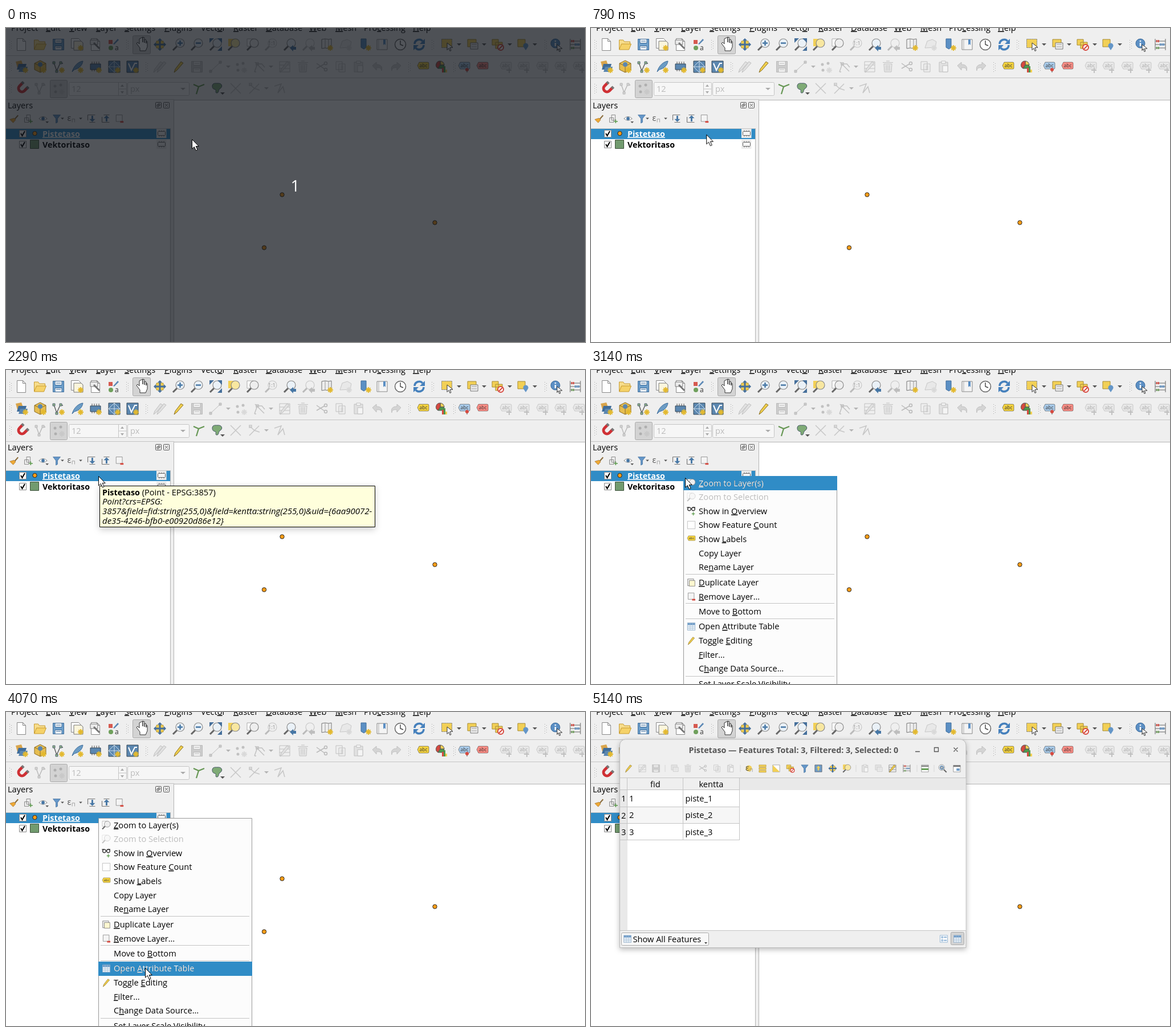
An HTML page for the animation above (8000 ms loop, 1016 px wide and 551 px high).

```html
<!DOCTYPE html>
<html lang="en">
<head>
<meta charset="utf-8">
<title>Opening an attribute table</title>
<style>
html, body { margin: 0; width: 100%; height: 100%; overflow: hidden; background: #fff; }
svg { display: block; }
text { font: 14.6px "Open Sans", "Noto Sans", sans-serif; white-space: pre; }
.b { font-weight: 700; font-size: 14.3px; }
.i { font-style: italic; font-size: 15px; }
.u { text-decoration: underline; }
.off { filter: grayscale(1); opacity: .38; }
.line { fill: none; stroke: #c4c4c4; }

#dim, #tip, #menu, #win, #hand, #arrow, #cursor, .hl { animation: 8s step-end infinite; }
#dim { animation-name: dim; }
#tip { animation-name: tip; filter: drop-shadow(0 4px 6px #0003); }
#menu { animation-name: menu; }
#win { animation-name: win; transform-origin: 354px 230px; }
#frame { filter: drop-shadow(0 3px 5px #0004); }
#hand { animation-name: hand; }
#arrow { animation-name: arrow; }
#cursor { animation-name: move; }
.hl { animation-name: hl; }

@keyframes dim { 0% { opacity: 1 } .87%, to { opacity: 0 } }
@keyframes tip { 0% { opacity: 0 } 28.62% { opacity: 1 } 32.12%, to { opacity: 0 } }
@keyframes menu { 0% { opacity: 0 } 32.12% { opacity: 1 } 55.37%, to { opacity: 0 } }
@keyframes hand { 0% { opacity: 0 } .87% { opacity: 1 } 4.4%, to { opacity: 0 } }
@keyframes arrow { 0% { opacity: 1 } .87% { opacity: 0 } 4.4%, to { opacity: 1 } }
@keyframes win {
  0% { opacity: 0; transform: scale(.8) }
  57.1% { opacity: 0; transform: scale(.8); animation-timing-function: steps(4, start) }
  60.7%, to { opacity: 1; transform: none }
}
@keyframes move {
  0% { transform: translate(326px, 195px) }
  2.62% { transform: translate(326px, 195px); animation-timing-function: steps(12, start) }
  13.38% { transform: translate(161px, 184px) }
  15.12% { transform: translate(161px, 184px); animation-timing-function: steps(3, start) }
  17.8% { transform: translate(160px, 185px) }
  19.62% { transform: translate(162px, 186px) }
  39.24% { transform: translate(165px, 189px) }
  40.12% { transform: translate(165px, 189px); animation-timing-function: steps(5, start) }
  44.6% { transform: translate(248px, 471px) }
  45.5% { transform: translate(248px, 471px); animation-timing-function: steps(7, start) }
  51.7% { transform: translate(244px, 449px) }
  58% { transform: translate(244px, 449px); animation-timing-function: steps(7, start) }
  64.2%, to { transform: translate(244px, 560px) }
}
@keyframes hl {
  0% { transform: translateY(-60px) }
  39.24% { transform: translateY(186px) }
  40.12% { transform: translateY(235px) }
  41% { transform: translateY(284.5px) }
  41.9% { transform: translateY(360.5px) }
  42.8% { transform: translateY(411.5px) }
  43.7% { transform: translateY(463px) }
  47.25%, to { transform: translateY(438px) }
}
</style>
</head>
<body>
<svg width="1016" height="551" viewBox="0 0 1016 551">
<defs>
  <path id="star" d="M6 1v10M1 6h10M2.5 2.5l7 7M9.5 2.5l-7 7" stroke="#e3b92f" stroke-width="2" fill="none"/>
  <path id="grip" d="M-1.5-8v17M1.5-6v15" stroke="#aaa" stroke-dasharray="1 3"/>
  <path id="drop" d="M-4-2h8l-4 4z" fill="#555"/>
  <path id="sep" d="M0-9v18" stroke="#ccc"/>
  <path id="page" d="M-7.5-10.5h10l5 5v16h-15zM2.5-10.5v5h5" fill="#fff" stroke="#888"/>
  <g id="folder" stroke="#c79a2f" stroke-linejoin="round"><path d="M-10.5 9V-8h7l2 3h10v4" fill="#f7dd8c"/><path d="M-10.5 9l4-10h17l-4 10z" fill="#f5d269"/></g>
  <g id="save" stroke="#3f6d9b"><path d="M-9.5-9.5h19v19h-19z" fill="#6d9fcb"/><path d="M-6-9.5h12v7h-12zM-6 2.5h12v7h-12z" fill="#f2f5f8"/><path d="M-4-6h8M-4 5h8"/></g>
  <g id="layout"><path d="M-10.5-10.5h13l3 3v14h-16z" fill="#fff" stroke="#888"/><path d="M-6-6h13l3 3v13h-16z" fill="#faf5dd" stroke="#777"/><use href="#star"/></g>
  <g id="manager"><use href="#page"/><path d="M-9-8h13v8h-13z" fill="#ececec" stroke="#777"/><path d="M-3-3l10 10" stroke="#777" stroke-width="3"/></g>
  <g id="style"><path d="M-9-8h7v7h-7z" fill="#d65a50"/><path d="M-1-1l8-9 2 2-8 8z" fill="#5a87b5"/><circle cx="-5" cy="6" r="4" fill="#6fa05c"/><text x="2" y="10" style="font-size:12px" fill="#333">a</text></g>
  <g id="pan"><path d="M-5-10v9l-3-3-2 2 6 8v5h10l3-7v-9l-2-1v4-6l-3-1v6-9l-3-1v9-9z" transform="translate(1)" fill="#fff" stroke="#333" stroke-linejoin="round"/></g>
  <g id="arrows"><path d="M-6-6h12v12h-12z" fill="#f2d056" stroke="#b89525"/><path d="M0-11l4 4H1.5v5.5H7V-4l4 4-4 4V1.5H1.5V7H4l-4 4-4-4h2.5V1.5H-7V4l-4-4 4-4v2.5h5.5V-7H-4z" fill="#456f9b"/></g>
  <g id="lens"><path d="M-10 10l7-7" stroke="#666" stroke-width="3"/><circle cx="2.5" cy="-2.5" r="7.5" stroke="#8a8a8a" stroke-width="1.2"/></g>
  <g id="zin"><use href="#lens" fill="#eaf1f7"/><path d="M-2-2.5h9M2.5-7v9" stroke="#4777a5" stroke-width="2.5"/></g>
  <g id="zout"><use href="#lens" fill="#eaf1f7"/><path d="M-2-2.5h9" stroke="#4777a5" stroke-width="2.5"/></g>
  <g id="zfull"><use href="#lens" fill="#eaf1f7"/><path d="M-11-11h8l-8 8zM11-11v8l-8-8zM11 11h-8l8-8z" fill="#456f9b"/></g>
  <g id="zsel"><path d="M-10-10h11v13h-11z" fill="#f2d056"/><use href="#lens" fill="#f8e7a0"/></g>
  <g id="zlay"><path d="M-10-10h11v13h-11z" fill="#fff" stroke="#aaa"/><use href="#lens" fill="#eee"/></g>
  <g id="zone"><use href="#lens" fill="#eee"/><text x="-5" y="1" style="font-size:9px">1:1</text></g>
  <g id="zlast"><use href="#lens" fill="#eaf1f7"/><path d="M0 6l6-5v3h5v5H6v3z" fill="#4777a5"/></g>
  <g id="map"><path d="M-9-9l6-1 6 1 5-1v16l-5 1-6-1-6 1z" fill="#eee" stroke="#777"/><path d="M-3-10V6M3-9V7" stroke="#999"/><use href="#star"/></g>
  <g id="cube"><path d="M-10 6l4-12 9-3 7 4-2 10z" fill="#ddd" stroke="#888"/><use href="#star"/></g>
  <g id="mark"><path d="M-7-10h9v15l-4 3-5-3z" fill="#5b8fc4" stroke="#3f6d9b"/><use href="#star"/></g>
  <g id="book"><path d="M-9-9h18v18h-18z" fill="#f4f4f4" stroke="#888"/><path d="M-6-9V9" stroke="#aaa"/><path d="M2-9h4v10l-2-2-2 2z" fill="#5b8fc4"/></g>
  <g id="clock"><circle r="9.5" fill="#fff" stroke="#666" stroke-width="1.5"/><path d="M0-7v7l5 2" fill="none" stroke="#444" stroke-width="1.4"/></g>
  <g id="reload"><path d="M-8-1a8 8 0 0 1 14-5M8 1a8 8 0 0 1-14 5" fill="none" stroke="#4580bc" stroke-width="3.5"/><path d="M10-10v9H1zM-10 10V1h9z" fill="#4580bc"/></g>
  <g id="select"><path d="M-9.5-9.5h18v15h-18z" fill="#f2d056" stroke="#777" stroke-dasharray="2 1"/><path d="M0-3l10 8-5 .5 2 5-2 1-2-5-3 3z" fill="#fff" stroke="#333"/></g>
  <g id="form"><path d="M-9-9h15v13h-15z" fill="#f2d056" stroke="#a58a35"/><path d="M-4-3h13v11h-13z" fill="#eee" stroke="#777"/><path d="M-2 0h9M-2 4h9" stroke="#999"/></g>
  <g id="fields" fill="#c5dbee" stroke="#6f9cc8"><path d="M-9.5-9h19V9h-19z" fill="#fff"/><path d="M-6-6h4v4h-4zM-6 2h4v4h-4zM1-5h6v2H1zM1 3h6v2H1z"/></g>
  <g id="unsel"><path d="M-10-9H1V1h-11zM-4-4h12V7H-4z" fill="#f2d056" stroke="#a58a35"/><circle cx="5" cy="5" r="5" fill="#fff" stroke="#d6493f" stroke-width="2"/><path d="M2 8l6-6" stroke="#d6493f" stroke-width="2"/></g>
  <g id="place"><path d="M-9-9H4V4H-9z" fill="#f2d056" stroke="#a58a35"/><path d="M5 10L1 4a4.5 4.5 0 1 1 8 0z" fill="#6496c8"/></g>
  <g id="info"><circle cx="-2" cy="-2" r="8" fill="#5b8fc4" stroke="#3f6d9b"/><path d="M-2-7v2M-2-3v6" stroke="#fff" stroke-width="2.5"/><path d="M1 0l9 7-5 .5 2 4-2 1-2-5-2 3z" fill="#fff" stroke="#333"/></g>
  <g id="abacus"><path d="M-9-10V10M9-10V10M-9-6H9M-9 0H9M-9 6H9" stroke="#666"/><g stroke-width="4" stroke-dasharray="2 1"><path d="M-7-6h6" stroke="#d6493f"/><path d="M-1 0h8" stroke="#5b8fc4"/><path d="M-7 6h6" stroke="#6fa05c"/></g></g>
  <g id="stack"><path d="M-11-9l10-2 4 11-10 5z" fill="#d9a54c"/><path d="M-6-5h14L5 5H-9z" fill="#3f6d9b"/><path d="M-3 0h13L7 9H-6z" fill="#5b87b0"/><use href="#star"/></g>
  <g id="pack"><path d="M0-11L10-6V5L0 10-10 5V-6z" fill="#e6bd50" stroke="#8a6b22"/><path d="M-10-6L0-1l10-5M0-1v11" fill="none" stroke="#8a6b22"/><circle cy="-4" r="4" fill="#5b87b0"/><use href="#star"/></g>
  <g id="vec"><path d="M-8-7l5 14 6-13 5 0" fill="none" stroke="#555" stroke-width="1.3"/><path d="M-10-9h4v4h-4zM-5 6h4v4h-4zM2-9h4v4H2z" fill="#8fb383" stroke="#567"/></g>
  <g id="vstar"><use href="#vec"/><use href="#star"/></g>
  <g id="quill"><path d="M-9 9C-6-2 2-9 10-10 9-3 4 3-5 5z" fill="#6b9cc5" stroke="#3f6d9b"/><use href="#star"/></g>
  <g id="chip"><path d="M-6-9V8M-2-9V8M2-9V8M6-9V8" stroke="#555"/><path d="M-9-5H9V5H-9z" fill="#5b87b0" stroke="#345"/><use href="#star"/></g>
  <g id="mesh"><path d="M-10-10h20v20h-20z" fill="#5b87b0" stroke="#345"/><path d="M-10 0h20M0-10v20M-10 0L0-10 10 0 0 10z" fill="none" stroke="#cfe0ee"/><use href="#star"/></g>
  <g id="virt"><path d="M-10-10h20v20h-20z" fill="#5b87b0" stroke="#345"/><path d="M-7-6L-2 6 4-6h4" fill="none" stroke="#fff" stroke-width="2"/><use href="#star"/></g>
  <path id="pencil" d="M-8 10l2-6L4-9l4 2.5L-3 6z" fill="#f0cf4d" stroke="#8a6f22"/>
  <g id="pencils"><use href="#pencil" x="-3"/><use href="#pencil" x="3"/></g>
  <path id="seg" d="M-9 8L8-8M-11 6h4v4h-4zM6-10h4v4H6z" fill="#999" stroke="#666"/>
  <g id="dots" fill="#777"><circle cx="-6" cy="-4" r="2.5"/><circle cx="4" cy="-6" r="2.5"/><circle cx="-5" cy="6" r="2.5"/><use href="#star"/></g>
  <path id="vertex" d="M-9 9l5-14h8l5 6M-8-8l16 16M-9 9h3M-6-7h4v4h-4z" fill="none" stroke="#777" stroke-width="1.5"/>
  <g id="edit"><path d="M-9-9H9V9H-9z" fill="#eee" stroke="#777"/><path d="M-9-3H9M-9 3H9" stroke="#777"/><use href="#pencil"/></g>
  <path id="trash" d="M-7-5l1 14H6L7-5zM-9-7.5H9M-3-10h6M-3-3V7M0-3V7M3-3V7" fill="#ddd" stroke="#777"/>
  <g id="cut" fill="none" stroke="#666" stroke-width="1.5"><path d="M-9-6L5 4M-9 3L5-5"/><circle cx="7" cy="5" r="2.5"/><circle cx="7" cy="-6" r="2.5"/></g>
  <g id="copy" fill="#eee" stroke="#777"><path d="M-8-9H3V5H-8zM-3-5H8V9H-3z"/><path d="M0-1h5M0 2h5M0 5h5"/></g>
  <g id="paste" stroke="#777"><path d="M-8-8H7V9H-8z" fill="#ccc"/><path d="M-4-10h7v4h-7zM-2-2h9V9h-9z" fill="#fff"/></g>
  <path id="undo" d="M-9-2l7-6v4c8 0 11 4 9 11 0-5-4-6-9-5v4z" fill="#aaa" stroke="#777"/>
  <use id="redo" href="#undo" transform="scale(-1 1)"/>
  <g id="abc"><path d="M-10-2l3-6H8q2 0 2 2v8q0 2-2 2H-7z" stroke="#0006" stroke-linejoin="round"/><text x="-6.5" y="1" style="font-size:8.5px" fill="#333">abc</text></g>
  <use id="abcY" href="#abc" fill="#f5d33f"/>
  <g id="abcB"><use href="#abc" fill="#a9cbea"/><path d="M5 5v5" stroke="#444"/><circle cx="5" cy="5" r="3" fill="#d6493f"/></g>
  <use id="abcR" href="#abc" fill="#ff8d85"/>
  <g id="abcP"><use href="#abc" fill="#ddd"/><path d="M1 6h9M6 2v9" stroke="#777" stroke-width="2"/></g>
  <g id="pie"><path d="M-3-3V-10a7 7 0 0 1 7 7z" fill="#f2d056" stroke="#555"/><path d="M-3-3V-10a7 7 0 0 0-4 13z" fill="#d6493f" stroke="#555"/><path d="M-3-3h7l-2 6-9 0z" fill="#4d9a4d" stroke="#555"/><path d="M0 2h3v8H0z" fill="#d6493f"/><path d="M3-1h3v11H3z" fill="#4d9a4d"/><path d="M6 5h3v5H6z" fill="#f2d056"/></g>
  <g id="magnet" fill="none" transform="rotate(45)"><path d="M-6-8V0a6 6 0 0 0 12 0V-8" stroke="#cf3034" stroke-width="5"/><path d="M-6-10v4M6-10v4" stroke="#777" stroke-width="5"/></g>
  <path id="topo" d="M-10-7l9 4L9-7M-1-3L-5 10" fill="none" stroke="#659653" stroke-width="2.2"/>
  <g id="blob"><path d="M-9-4c0-6 6-5 9-5 8-1 10 6 5 9-4 2-2 8-6 8s0-5-3-6-5-2-5-6z" fill="#7fab76" stroke="#456"/><use href="#drop" x="9" y="9"/></g>
  <path id="cross" d="M-9-9L9 9M9-9L-9 9" stroke="#888" stroke-width="1.6"/>
  <path id="bow" d="M-9 9L8-8M-8-7L0 0l9 3M-9-9h4v4h-4z" fill="none" stroke="#888" stroke-width="1.6"/>
  <path id="trace" d="M-9-4L3-8-3 8 6-3l3 11" fill="none" stroke="#888" stroke-width="1.6"/>
  <g id="brush"><path d="M1 0l8-9 2 2-8 9z" fill="#8a6b3a"/><path d="M-10 2L0-1l4 4-6 7z" fill="#efaa35" stroke="#a06b1f"/></g>
  <g id="group" fill="#eee" stroke="#666"><path d="M-9-2h10V9H-9zM-4-9h9V4h-9z"/><path d="M6 2v9M2 7h9" stroke="#5a9a4a" stroke-width="2"/></g>
  <g id="eye"><path d="M-10 0Q0-10 10 0 0 9-10 0z" fill="#fff" stroke="#666"/><circle r="4" fill="#4777a5"/><use href="#drop" x="10" y="9"/></g>
  <path id="filter" d="M-9-9H9L2 0v9l-4 2V0z" fill="#6496c8" stroke="#3f6d9b"/>
  <g id="eps"><text x="-9" y="6" style="font-size:20px" fill="#555">ε</text><path d="M3 1h6v8M3 1v8" fill="none" stroke="#888"/></g>
  <g id="expand"><path d="M-9-9H9M-5 9H9M-9-9v13" stroke="#777" stroke-width="1.6"/><path d="M2-7v10" stroke="#4777a5" stroke-width="4"/><path d="M-5 1H9L2 8z" fill="#4777a5"/></g>
  <use id="fold" href="#expand" transform="scale(1 -1)"/>
  <g id="remove"><path d="M-8-9H7V7H-8z" fill="#f4f4f4" stroke="#777"/><path d="M2 8h8" stroke="#d6493f" stroke-width="4"/></g>
  <g id="glasses" fill="#fff" stroke="#222" stroke-width="1.8"><path d="M-11-9l5 0M3-9l7 0"/><circle cx="-5" cy="-5" r="4"/><circle cx="5" cy="-5" r="4"/><path d="M5 3v8M1 7h8" stroke="#5a9a4a"/></g>
  <path id="box" d="M-9.5-9.5h19v19h-19z" fill="#fff" stroke="#aaa"/>
  <g id="dup"><path d="M-9-9H6V8H-9z" fill="#eee" stroke="#666"/><path d="M-5-5H9V9H-5z" fill="#fff8d0" stroke="#666"/></g>
  <g id="table"><path d="M-9.5-9H9.5V9.5h-19z" fill="#e8f0f7" stroke="#7fa0c0"/><path d="M-9-8.5H9v5H-9z" fill="#6f9cc8"/><path d="M-3-9V9M3-9V9M-9 1H9M-9 5H9" stroke="#a5bfd6"/></g>
  <g id="tEps"><circle r="8" fill="#f2d056"/><use href="#eps"/></g>
  <path id="list" d="M-9-9H9v5H-9zM-9-2H9v5H-9zM-9 5H9v5H-9z" fill="#f2d056" stroke="#b59431"/>
  <g id="invert"><path d="M-9-9H9V9H-9z" fill="#fff" stroke="#888"/><path d="M-9-9L9 9H-9z" fill="#f2d056"/></g>
  <g id="top"><path d="M-9-9H9V9H-9z" fill="#6f9cc8" stroke="#555"/><path d="M0-7l5 6H2v6h-4V-1h-3z" fill="#f2d056"/></g>
  <g id="rows"><path d="M-9-9H9V9H-9z" fill="#fff" stroke="#777"/><path d="M-9-6H9" stroke="#777" stroke-width="3"/><path d="M-9 2H9" stroke="#5a9a4a" stroke-width="4"/></g>
  <g id="cog"><use href="#lens" fill="#eaf1f7" transform="scale(-1 1)"/><circle cx="-2" cy="-2" r="4" fill="#bbb" stroke="#4777a5" stroke-width="3" stroke-dasharray="2 1"/></g>
  <g id="dock"><path d="M-9-8H9V9H-9z" fill="#fff" stroke="#777"/><path d="M-9-6H9" stroke="#777" stroke-width="4"/><path d="M-1 0h8v6h-8z" fill="#6f9cc8"/></g>
  <g id="ram"><path d="M-9-8H8.5V8H-9z" fill="#ececec"/><path d="M-4-5.5v11M0-5.5v11M4-5.5v11" stroke="#777"/><rect x="-6.500" y="-3.500" width="13" height="7" rx="1" fill="#f5f5f5" stroke="#666"/></g>
  <g id="check"><path d="M-5.5-5.5h12v12h-12z" fill="#fff" stroke="#888"/><path d="M-3 0l2.500 4L4-4" fill="none" stroke="#000" stroke-width="2"/></g>
  <circle id="pt" r="3.700" fill="#ff9e17" stroke="#232323"/>
  <clipPath id="bar"><rect class="hl" x="162" width="270" height="25"/></clipPath>
</defs>

<path d="M0 0h1016v126H0zM0 126h295v50H0zM288 176h7v375h-7z" fill="#efefef"/>
<path class="line" d="M0 48.500h1016M0 87.500h1016M0 125.500h295M0 176.500h288"/>
<path d="M294.500 551V126.500H1016M288.500 176V551" fill="none" stroke="#b4b4b4"/>
<g id="bars"></g>
<g fill="#d3d3d3" stroke="#aaa"><rect x="222.500" y="13.500" width="31" height="32" rx="2"/><rect x="77.500" y="91.500" width="30" height="31" rx="2"/></g>
<use href="#pan" x="238" y="29"/>
<g class="off"><use href="#dots" x="92" y="106"/></g>
<g fill="#f6f6f6" stroke="#c4c4c4"><rect x="110.500" y="95.500" width="101" height="23" rx="2"/><rect x="213.500" y="95.500" width="108" height="23" rx="2"/><path d="M197.500 96v22M198 107h13"/></g>
<path d="M201 103l3-4 3 4zM201 111l3 4 3-4zM306 105h9l-4.500 4z" fill="#aaa"/>
<g fill="#bcbcbc"><text x="115" y="112">12</text><text x="218" y="112">px</text></g>
<g id="tops"></g>

<text x="3" y="140.500">Layers</text>
<g fill="none" stroke="#555"><rect x="262.500" y="130.500" width="10" height="10" rx="1"/><rect x="276.500" y="130.500" width="10" height="10" rx="1"/><path d="M265 135h3v3h-3zM267 135v-2h3v3h-2M279 133l5 5M284 133l-5 5"/></g>
<path d="M0 177h288v18H0z" fill="#308cc6"/>
<use href="#check" x="29" y="185"/><use href="#check" x="29" y="204"/>
<use href="#pt" x="50.500" y="185"/>
<path d="M42.500 196.500h15v15h-15z" fill="#729b6f" stroke="#3d503b"/>
<text class="b u" x="64" y="190.500" fill="#fff">Pistetaso</text>
<text class="b" x="64" y="209.500">Vektoritaso</text>
<use href="#ram" x="273" y="185"/><use href="#ram" x="273" y="204"/>
<use href="#pt" x="484.500" y="292.500"/><use href="#pt" x="752.500" y="341.500"/><use href="#pt" x="453" y="385.500"/>

<g id="tip">
  <path d="M164.500 203.500h483v72h-483z" fill="#ffffdc" stroke="#000"/>
  <text x="169" y="219.500"><tspan class="b">Pistetaso</tspan> (Point - EPSG:3857)</text>
  <text class="i" x="169" y="236">Point?crs=EPSG:</text>
  <text class="i" x="169" y="253">3857&amp;field=fid:string(255,0)&amp;field=kentta:string(255,0)&amp;uid={6aa90072-</text>
  <text class="i" x="169" y="269.500">de35-4246-bfb0-e00920d86e12}</text>
</g>

<g id="menu">
  <path d="M162.500 186.500h269V560h-269z" fill="#fcfcfc" stroke="#999"/>
  <path class="line" d="M166 358.500h261M166 409.500h261M166 436.500h261M166 537.500h261"/>
  <rect class="hl" x="162" width="270" height="25" fill="#308cc6"/>
  <g id="items"></g>
  <use href="#items" fill="#fff" clip-path="url(#bar)"/>
  <g id="itemIcons"></g>
</g>

<g id="win">
  <path id="frame" d="M50.500 413.500V58a10 10 0 0 1 10-10H648a10 10 0 0 1 10 10V413.500z" fill="#efefef" stroke="#bcbcbc"/>
  <path d="M64 137h593.500v246H64z" fill="#fff"/>
  <path d="M64 166h197v29H64z" fill="#f6f6f6"/>
  <path d="M261 116h396.500v21H261zM51 137h13v246H51z" fill="#e9e9e9"/>
  <path class="line" d="M51 115.500h607M51 136.500h210M51 166.500h210M51 195.500h210M51 224.500h210M63.500 116v109M161.500 116v109M260.500 116v109M51 383.500h607"/>
  <text class="b" x="171.500" y="72" fill="#555">Pistetaso — Features Total: 3, Filtered: 3, Selected: 0</text>
  <path d="M569 69.500h8M602.500 62.500h7v7h-7zM636.500 62.500l7 7M643.500 62.500l-7 7" fill="none" stroke="#555" stroke-width="1.300"/>
  <g id="winIcons"></g>
  <text x="104" y="132">fid</text><text x="189.500" y="132">kentta</text>
  <g id="cells"></g>
  <rect x="53.500" y="387.500" width="153" height="22" rx="2" fill="#f8f8f8" stroke="#aaa"/>
  <text x="73.500" y="404">Show All Features</text>
  <path d="M199 404h5l-2.500 3z" fill="#444"/>
  <rect x="631.500" y="386.500" width="23" height="22" rx="2" fill="#d3d3d3" stroke="#aaa"/>
  <g id="footIcons"></g>
</g>

<g id="dim"><path d="M0 0h1016v551H0z" fill="#12161e" opacity=".73"/><text x="499.500" y="286.500" fill="#fff" style="font-size:28px">1</text></g>

<g id="cursor" stroke="#000" fill="#fff" stroke-linejoin="round">
  <path id="arrow" d="M.5.5V17l3.800-3.500L7.300 20l2.800-1.300L7.200 12.500h5z"/>
  <g id="hand"><path d="M-4.500-1.500q0-2 2-1.500 2-2 4 0 2-1 3.500.5 2.500-.5 2.500 2v4l-1.500 4.500v1.500h-10V8l-3-3q-1-3 2.500-2.500z" stroke-width="1.400"/><path d="M-2 2v2M1 2v2M4 2v2" stroke="#bbb"/></g>
</g>
</svg>
<script>
const add = (id, html) => document.getElementById(id).insertAdjacentHTML('beforeend', html);

// "name x, name x, ..." placed along one line
const icons = (id, y, scale, list, cls = '') => add(id, `<g class="${cls}">` + list.split(', ').map(item => {
  const [name, x] = item.split(' ');
  return `<use href="#${name}" transform="translate(${x} ${y}) scale(${scale})"/>`;
}).join('') + '</g>');

// an underscore marks the shortcut letter
const label = (id, x, y, text, attr = '') =>
  add(id, `<text x="${x}" y="${y}" ${attr}>${text.replace(/_(.)/, '<tspan class="u">$1</tspan>')}</text>`);

[['Pro_ject', 9], ['_Edit', 70], ['_View', 111], ['_Layer', 158], ['_Settings', 208], ['_Plugins', 278],
 ['Vect_or', 342], ['_Raster', 399], ['_Database', 456], ['_Web', 532], ['_Mesh', 578],
 ['Pro_cessing', 628], ['_Help', 714]].forEach(([text, x]) => label('tops', x, 4.5, text));

icons('bars', 29, 1, 'grip 8, page 27, folder 60, save 92, layout 125, manager 157, style 189, grip 213, arrows 270, zin 303, zout 335, zfull 368, zsel 400, zlay 433, zlast 498, map 563, mark 630, book 660, clock 692, reload 725, grip 749, select 774, drop 795, form 819, drop 839, unsel 863, drop 884, place 907, drop 928, grip 947, info 966, abacus 999');
icons('bars', 29, 1, 'zone 465, zlast 531, cube 596', 'off');
icons('bars', 68, 1, 'grip 8, stack 28, pack 60, vstar 92, quill 125, chip 157, mesh 190, virt 222, grip 247, pencil 303, grip 708, abcY 732, pie 765, grip 787, abcB 804, abcR 836');
icons('bars', 68, 1, 'pencils 270, save 335, seg 368, drop 390, dots 412, vertex 445, drop 465, edit 489, trash 521, cut 554, copy 587, paste 619, undo 652, redo 684, abcP 877, abcP 908, abcP 941, abcP 973, abcP 1005', 'off');
icons('bars', 106, 1, 'grip 8, magnet 28, topo 339, blob 371');
icons('bars', 106, 1, 'vec 61, cross 403, bow 436, drop 457, trace 480', 'off');
icons('bars', 159, .72, 'brush 14, group 39, eye 65, filter 89, drop 99, eps 114, drop 131, expand 150, fold 175, remove 199');

[['_Zoom to Layer(s)', 203.5, 'zlay'], ['Zoom to Selection', 228, 'zlay'], ['Show in _Overview', 252.5, 'glasses'],
 ['Show Feature _Count', 277, 'box'], ['Show _Labels', 301.5, 'abcY'], ['Copy Layer', 326.5], ['Re_name Layer', 351],
 ['_Duplicate Layer', 378, 'dup'], ['_Remove Layer…', 402.5, 'remove'], ['Move to _Bottom', 429],
 ['Open _Attribute Table', 455, 'table'], ['Toggle _Editing', 480, 'pencil'], ['_Filter…', 504.5],
 ['C_hange Data Source…', 529], ['_Set Layer Scale Visibility…', 555.5]].forEach(([text, y, icon], i) => {
  label('items', 189, y, text, i == 1 ? 'fill="#bcbcbc"' : '');
  if (icon) icons('itemIcons', y - 5, .7, icon + ' 176', i == 1 ? 'off' : '');
});

icons('winIcons', 99, .68, 'pencil 66, sep 130, sep 262, tEps 277, list 301, invert 325, unsel 350, filter 375, top 399, arrows 424, zsel 449, sep 465, edit 529, abacus 554, sep 572, rows 586, sep 602, cog 617, dock 642');
icons('winIcons', 99, .68, 'edit 90, save 114, form 147, trash 170, cut 196, copy 221, paste 245, paste 481, form 505', 'off');
icons('footIcons', 398, .68, 'table 64, fields 619, table 643');
[1, 2, 3].forEach(n => {
  const y = 127.5 + n * 29.4;
  add('cells', `<text x="53" y="${y + .5}">${n}</text><text x="67" y="${y}">${n}</text><text x="165.5" y="${y}">piste_${n}</text>`);
});
</script>
</body>
</html>
```
